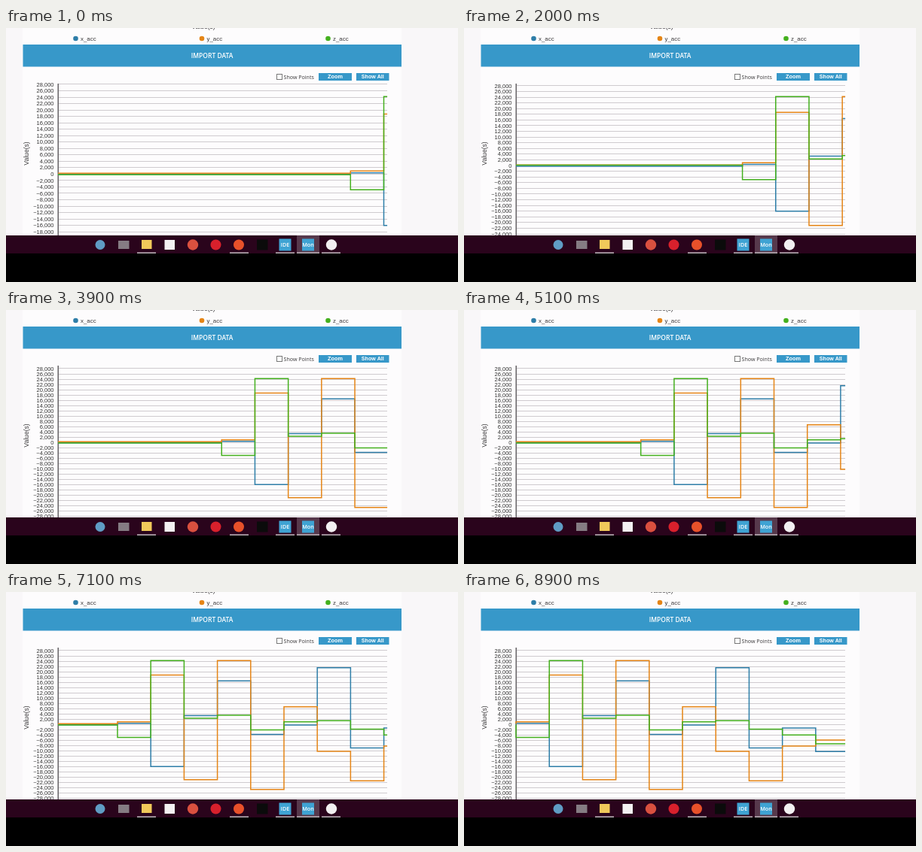
These frames come from a looping animation (600x338 px, 9000 ms). An HTML page with a canvas:

```html
<!DOCTYPE html>
<html lang="en">
<head>
<meta charset="utf-8">
<title>Accelerometer chart</title>
<style>
html, body { margin: 0; width: 100%; height: 100%; overflow: hidden; background: #000; }
canvas { display: block; width: 100vw; height: 100vh; }
</style>
</head>
<body>
<canvas id="stage" width="600" height="338"></canvas>
<script>
const ctx = document.getElementById('stage').getContext('2d');
const ARIAL = '"Liberation Sans", Arial, sans-serif';
const SANS = '"Open Sans", "Noto Sans", sans-serif';
const BLUE = '#3798c9';
const LOOP = 9000, STEP = 44.2;
const plot = { left: 69, right: 506.3, top: 74, bottom: 279.8 };

const series = [
  { name: 'x_acc', color: '#2e7ea8', dot: 92.5,
    data: [400, -16000, 3300, 16500, -3800, -200, 21500, -8900, -1400, -10300] },
  { name: 'y_acc', color: '#e58516', dot: 260,
    data: [1000, 18700, -21000, 24250, -24650, 6700, -10200, -21400, -8200, -5900] },
  { name: 'z_acc', color: '#44b01e', dot: 427.5,
    data: [-4900, 24200, 2350, 3500, -2050, 950, 1400, -1800, -4000, -7350] }
];
// Sensor level at rest, for each stretch of the recording
const rest = [[-150, 250, -200], [-250, 200, 150], [-150, 250, -250]];

function rect(x, y, w, h, color) {
  ctx.fillStyle = color;
  ctx.fillRect(x, y, w, h);
}

function disc(x, y, r, color) {
  ctx.fillStyle = color;
  ctx.beginPath();
  ctx.arc(x, y, r, 0, Math.PI * 2);
  ctx.fill();
}

function text(str, x, y, font, color = '#3c3a3c', align = 'left') {
  ctx.font = font;
  ctx.fillStyle = color;
  ctx.textAlign = align;
  ctx.fillText(str, x, y);
}

function drawPage() {
  rect(0, 0, 600, 276, '#f9f7f9');
  rect(22, 0, 503, 276, '#fdfcfd');
  text('Value(s)', 262, 0.5, '8.6px ' + ARIAL, '#3c3a3c', 'center');
  for (const s of series) {
    disc(s.dot, 14, 3.3, s.color);
    text(s.name, s.dot + 6.5, 16.7, '7.9px ' + ARIAL);
  }
  rect(22.5, 22, 502.5, 29.5, BLUE);
  text('IMPORT DATA', 273.5, 40, '600 8.5px ' + SANS, '#fff', 'center');

  ctx.strokeStyle = '#777';
  ctx.lineWidth = 1;
  rect(359, 61, 8, 8, '#fff');
  ctx.strokeRect(359.5, 61.5, 7, 7);
  text('Show Points', 368.5, 67.6, '7.1px ' + SANS);
  rect(415, 60, 44, 10, BLUE);
  rect(465, 60, 43.5, 10, BLUE);
  text('Zoom', 437, 67.3, 'bold 7.3px ' + ARIAL, '#fff', 'center');
  text('Show All', 486.8, 67.3, 'bold 7.1px ' + ARIAL, '#fff', 'center');

  ctx.save();
  ctx.translate(29.5, 167);
  ctx.rotate(-Math.PI / 2);
  text('Value(s)', 0, 0, '8.6px ' + ARIAL, '#3c3a3c', 'center');
  ctx.restore();
}

function drawChart(t) {
  // Scrolling slows a little in the middle of the recording
  const lag = Math.min(1, Math.max(0, (t - 3.9) / 2.3));
  const start = 457.3 - 43.86 * t + 2.1 * lag;
  const count = Math.min(10, Math.ceil((506 - start) / STEP));

  // Fit the axis to the received points, with a tenth of the range as padding
  const seen = series.flatMap(s => s.data.slice(0, count));
  const max = Math.max(...seen), min = Math.min(...seen);
  const pad = (max - min) / 10;
  const scale = (plot.bottom - plot.top) / (max - min + 2 * pad);
  const yOf = v => plot.top + (max + pad - v) * scale;

  for (let v = 28000; v >= min - pad; v -= 2000) {
    const y = yOf(v);
    rect(plot.left, Math.round(y - 0.5), 437, 1, '#cfcbcf');
    const label = (v < 0 ? '\u2212' : '') + Math.abs(v).toLocaleString('en-US');
    text(label, 63.5, y + 2.6, '7.5px ' + ARIAL, '#333', 'right');
  }
  rect(68.5, 74, 1.5, 202, '#666366');

  ctx.save();
  ctx.beginPath();
  ctx.rect(68, 70, plot.right - 68, 206);
  ctx.clip();
  ctx.lineWidth = 1.5;
  const stage = t < 1 ? 0 : t < 3 ? 1 : 2;
  series.forEach((s, i) => {
    let y = yOf(rest[stage][i]);
    ctx.strokeStyle = s.color;
    ctx.beginPath();
    ctx.moveTo(plot.left, y);
    for (let k = 0; k < count; k++) {
      const x = start + k * STEP;
      ctx.lineTo(x, y);
      y = yOf(s.data[k]);
      ctx.lineTo(x, y);
    }
    ctx.lineTo(plot.right, y);
    ctx.stroke();
  });
  ctx.restore();
}

function tile(x, label) {
  rect(x - 8, 280.5, 16, 16, '#3fa3d3');
  text(label, x, 291.4, '600 7.2px ' + SANS, '#fff', 'center');
}

function drawTaskbar() {
  rect(0, 276, 600, 24, '#2a041c');
  rect(0, 300, 600, 38, '#000');
  rect(386, 276, 30, 24, '#57394c');
  for (const [x, w] of [[174, 25], [297, 25], [358, 25], [386, 30], [419, 25]]) {
    rect(x, 298.5, w, 1.5, '#c4b9c0');
  }
  disc(125, 288.5, 6.5, '#5f9cc4');
  rect(149, 283, 14.5, 11, '#857c83');
  rect(180, 282, 13.5, 12, '#f0c95a');
  rect(210.5, 282, 13.5, 13, '#f3f1f2');
  disc(248, 288.5, 7.2, '#d9503f');
  disc(278.5, 288.5, 7, '#d8202c');
  disc(309, 288.5, 7, '#e8512a');
  rect(333, 281.5, 14.5, 14, '#0b0b0b');
  tile(370.5, 'IDE');
  tile(401, 'Mon');
  disc(432, 288.5, 7.2, '#f2f0f1');
}

function frame(now) {
  const t = Math.floor(now % LOOP / 100) / 10;
  drawPage();
  drawChart(t);
  drawTaskbar();
  requestAnimationFrame(ms => frame(ms - begin));
}

const begin = performance.now();
frame(0);
</script>
</body>
</html>
```
